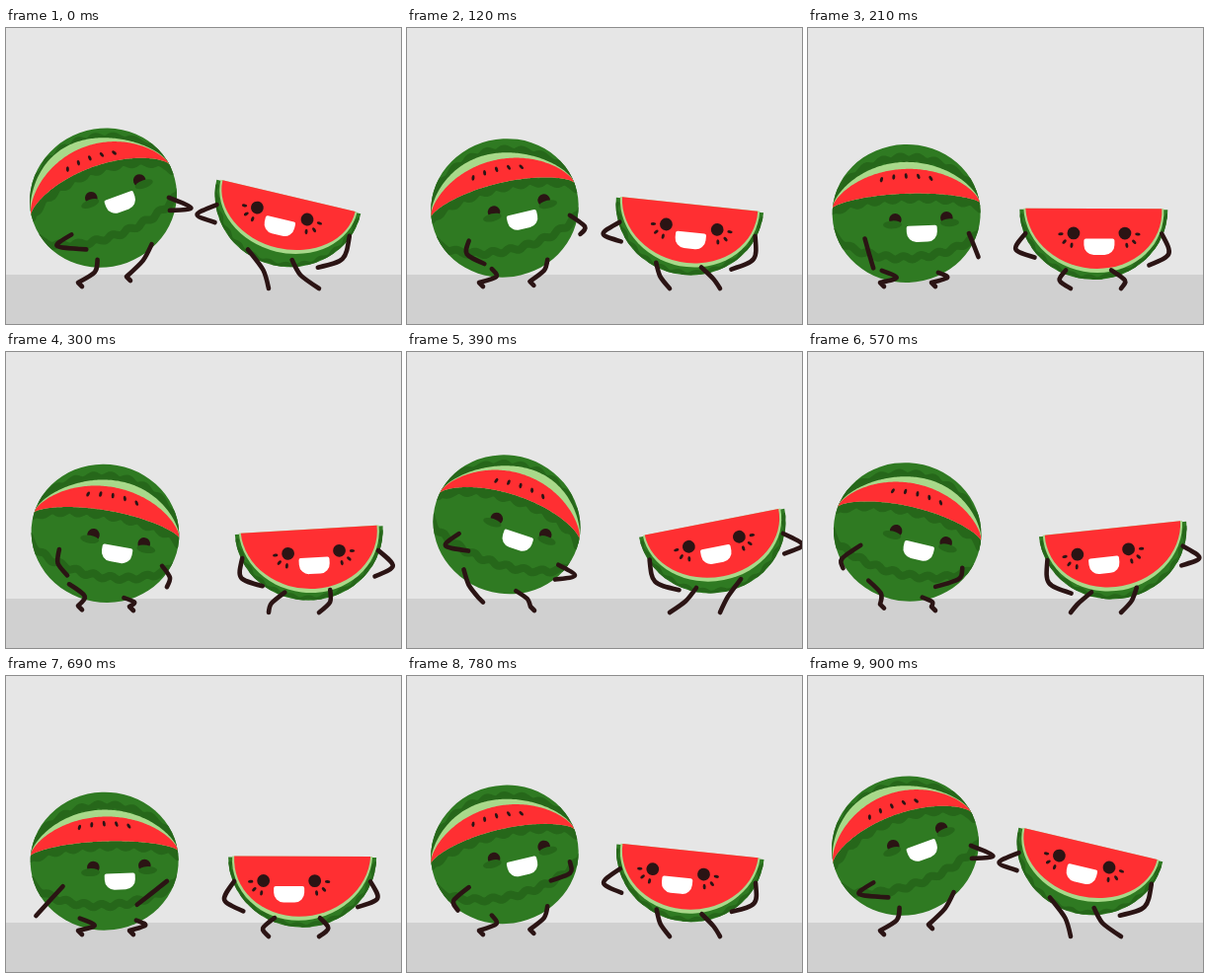
An HTML page with a canvas that plays this animation: 400x300 px, repeating every 0.93 s.

```html
<!DOCTYPE html>
<html lang="en">
<head>
<meta charset="utf-8">
<title>Dancing melons</title>
<style>
  html, body { margin: 0; width: 400px; height: 300px; overflow: hidden; background: #e6e6e6; }
  canvas { display: block; }
</style>
</head>
<body>
<canvas id="stage" width="400" height="300"></canvas>
<script>
const ctx = document.getElementById('stage').getContext('2d');
const LOOP = 930, CYCLE = 900, STEP = 30, RAD = Math.PI / 180;
const GREEN = '#2f7a22', DARK = '#26671a', LIGHT = '#a8d98a', RED = '#ff2f32', INK = '#2b1414';

// The beat of the dance: swing goes 1 to -1 and back, air is 1 at each hop's top.
function beat(time) {
  const angle = time / CYCLE * Math.PI * 2;
  const swing = Math.cos(angle), drift = Math.sin(angle);
  return {
    angle, swing, drift,
    air: swing ** 2,
    crouch: drift ** 2,
    drop: Math.pow(Math.sin(angle + 3 * RAD) ** 2, 0.85),
  };
}

// Stage position of a point fixed to a tilted body.
function place({ x, y, tilt }, dx, dy) {
  const c = Math.cos(tilt), s = Math.sin(tilt);
  return [x + dx * c - dy * s, y + dx * s + dy * c];
}

function enter({ x, y, tilt }) {
  ctx.save();
  ctx.translate(x, y);
  ctx.rotate(tilt);
}

// A limb from a to b whose middle is pushed aside by (dx, dy).
function drawLimb([ax, ay], [bx, by], dx, dy, toe = 0) {
  const px = (ax + bx) / 2 + dx * 4 / 3, py = (ay + by) / 2 + dy * 4 / 3;
  ctx.beginPath();
  ctx.moveTo(ax, ay);
  ctx.bezierCurveTo(px, py, px, py, bx, by);
  if (toe) ctx.lineTo(bx + toe, by + toe);
  ctx.strokeStyle = INK;
  ctx.lineWidth = 4.6;
  ctx.stroke();
}

function drawArm([x, y], reachX, reachY, dx, dy) {
  drawLimb([x, y], [x + reachX, y + reachY], dx, dy);
}

function ellipse(x, y, rx, ry, color, turn = 0, end = Math.PI * 2) {
  ctx.beginPath();
  ctx.ellipse(x, y, rx, ry, turn, 0, end);
  ctx.fillStyle = color;
  ctx.fill();
}

function drawMouth(x, y) {
  ctx.beginPath();
  ctx.roundRect(x - 15.5, y - 8, 31, 16.5, [2, 2, 10, 10]);
  ctx.fillStyle = '#fff';
  ctx.fill();
}

// Points of a bow across the melon, optionally wavy or leaning to one side.
function bow(base, peak, wave = 0, lean = 0) {
  const points = [];
  for (let x = -75; x <= 75; x += 1.5) {
    const room = 1 - (x / 75) ** 2;
    points.push([x, base + (peak - base) * Math.pow(room, 0.68)
      + wave * Math.sin(x / 2.8) + lean * x * room]);
  }
  return points;
}

function tracePath(points) {
  ctx.beginPath();
  points.forEach(([x, y]) => ctx.lineTo(x, y));
}

function stripe(points, width) {
  tracePath(points);
  ctx.strokeStyle = DARK;
  ctx.lineWidth = width;
  ctx.stroke();
}

function band(top, bottom, color) {
  tracePath([...top, ...bottom.reverse()]);
  ctx.fillStyle = color;
  ctx.fill();
}

function drawMelon({ angle, swing, drift, air, crouch, drop }) {
  const body = { x: 99.8 - 1.3 * swing, y: 172 + 16 * drop, tilt: -20 * swing * RAD };
  const lift = -10 * air, lower = -20 + 1.3 * lift;
  enter(body);
  ellipse(0, 0, 75, 70, GREEN);
  ctx.save();
  ctx.clip();
  stripe(bow(-10, -56 + lift / 2, 1.8, 0.06 * swing), 8);
  stripe(bow(-4, lower + 4, 1.8), 9);
  stripe(bow(18, 45 + lift / 2, 1.8), 8);
  band(bow(-8, -52 + lift, 0, 0.1 * swing), bow(-8, lower), LIGHT);
  band(bow(-8, -45 + lift), bow(-8, lower), RED);
  ctx.restore();
  for (let i = -2; i <= 2; i++) {
    const x = i * 12.5 + 1;
    ellipse(x, -38 + 0.005 * x * x + 0.45 * lift, 1.5, 2.8, INK, -0.1 - x * 0.018);
  }
  const eyeY = 6 + lift;
  for (const side of [-1, 1]) {
    const x = 14.5 + side * 26;
    ellipse(x, eyeY, 6.3, 6.3, INK);
    ellipse(x + side * 3, eyeY + 5, 9.5, 4, DARK);
  }
  drawMouth(15, eyeY + 15);
  ctx.restore();

  const twice = Math.cos(2 * angle);
  drawArm(place(body, -43, 24), 18 * drift + 5 * swing + 10 * twice, 15 + 15 * crouch, -22 * air, 4 * air);
  drawArm(place(body, 62.5, 22.5), 20 * drift + 6 * swing + 3 * twice - 8, 13 + 11 * crouch, 22 * air, 4 * air);
  // The foot on the far side of the swing leaves the floor.
  const kick = side => Math.max(0, side * swing) ** 4;
  drawLimb(place(body, -27, 57), [73, 258 - 12 * kick(-1)], 16 * crouch + 7 * swing ** 3, 1, 4);
  drawLimb(place(body, 30, 61), [125 - 3 * kick(1), 258 - 6 * kick(1)], 4 + 9 * crouch ** 3, 0, 4);
}

function drawSlice({ angle, swing, drift, air, crouch, drop }) {
  const body = {
    x: 297.5 - 11 * Math.tanh(3.5 * Math.cos(angle - 10 * RAD)),
    y: 170 + 13 * drop,
    tilt: 13.3 * swing * Math.abs(swing) * RAD,
  };
  const faceX = -4 + 9.6 * drift + 1.5 * swing, eyeY = 19 + 6 * drop;
  const squash = 7 * air ** 2;
  enter(body);
  ellipse(0, 1, 75, 71, GREEN, 0, Math.PI);
  ctx.save();
  ctx.clip();
  const rim = [];
  for (let a = 0.1; a < 3.05; a += 0.02) {
    const wave = 1.3 * Math.sin(a * 26);
    rim.push([(74 + wave) * Math.cos(a), (70 + wave) * Math.sin(a)]);
  }
  stripe(rim, 4);
  ctx.restore();

  ctx.save();
  ctx.transform(1, 0, (faceX + 4) * 0.006, 1, 0, 0);
  ellipse(0, 0, 71, 65 - squash, LIGHT, 0, Math.PI);
  ellipse(0, 0, 69, 61 - squash, RED, 0, Math.PI);
  ctx.restore();

  for (const side of [-1, 1]) {
    const x = faceX + side * 26;
    ellipse(x, eyeY, 6.4, 6.4, INK);
    for (const turn of [0.15, 0.8, 1.5])
      ellipse(x + side * 13 * Math.sin(turn), eyeY + 12.5 * Math.cos(turn), 1.5, 2.7, INK, -side * turn);
  }
  drawMouth(faceX, eyeY + 13.5);
  ctx.restore();

  // Both arms make the same move, mirrored and half a cycle apart.
  for (const side of [-1, 1]) {
    const s = side * swing, d = side * drift;
    drawArm(place(body, side * 69, 25.5),
      -side * (13 + 17 * s + 2 * Math.cos(2 * angle)), 25 + 7 * s + 3 * d + 3 * crouch,
      side * (14 - 5 * s), 4 + 3 * s);
    drawLimb(place(body, -5 + side * 23, 62.5), [291.5 + side * 25.5, 264],
      side * (9 * crouch - 5 * air), 1);
  }
}

function draw(now) {
  const time = Math.floor((now % LOOP) / STEP) * STEP % CYCLE;
  const now_ = beat(time);
  ctx.fillStyle = '#e6e6e6';
  ctx.fillRect(0, 0, 400, 250);
  ctx.fillStyle = '#d0d0d0';
  ctx.fillRect(0, 250, 400, 50);
  drawMelon(now_);
  drawSlice(now_);
}

ctx.lineCap = ctx.lineJoin = 'round';
const start = performance.now();
function tick() {
  draw(performance.now() - start);
  requestAnimationFrame(tick);
}
tick();
</script>
</body>
</html>
```
